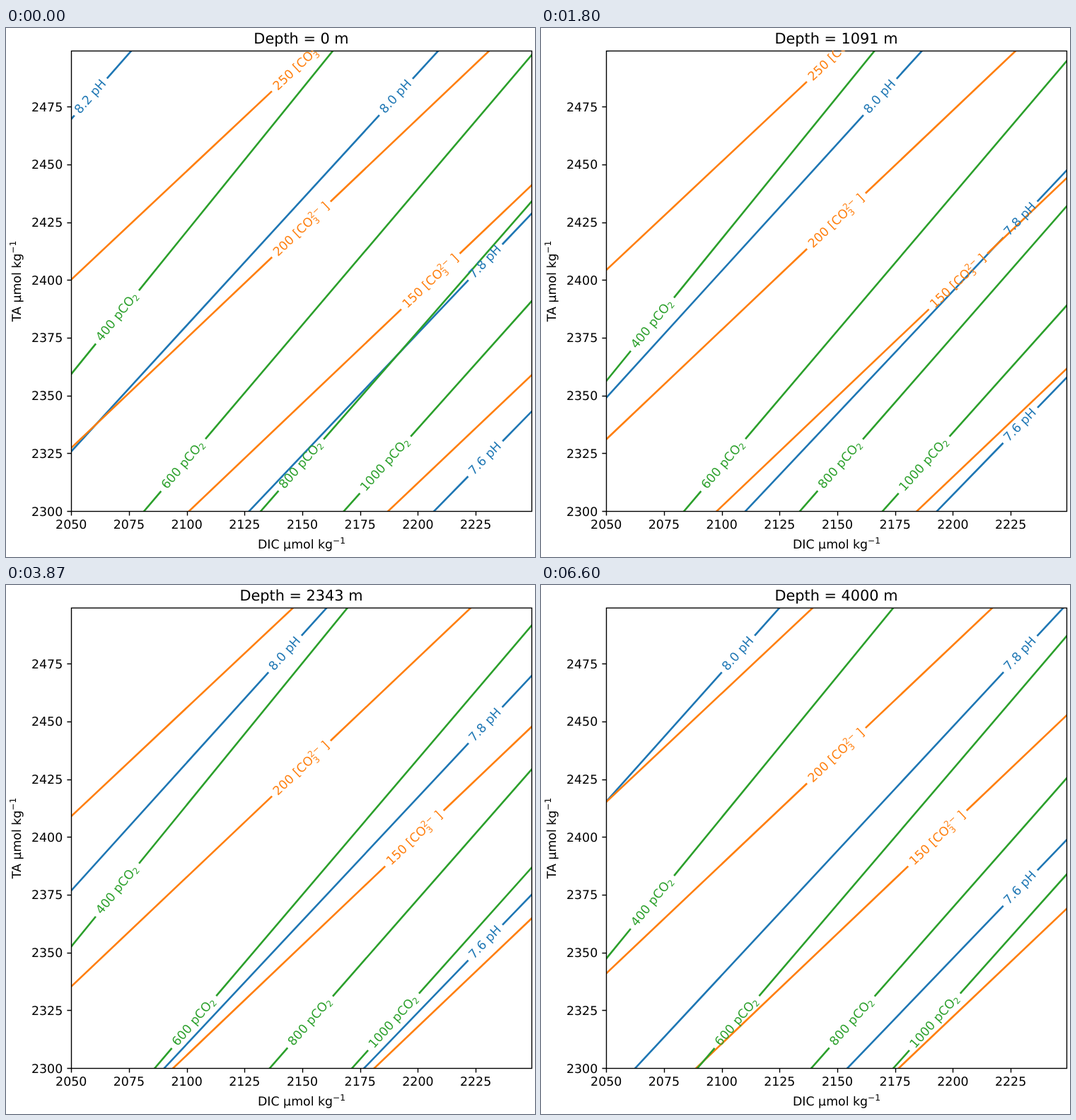
Write an HTML page that moves like this. It is 748x748 px and loops after 6670 ms.

```html
<!DOCTYPE html>
<html lang="en">
<head>
<meta charset="utf-8">
<style>
  html, body { margin: 0; width: 100%; height: 100%; overflow: hidden; background: #fff; }
  svg { display: block; width: 748px; height: 748px; }
  text { font-family: "DejaVu Sans", sans-serif; font-size: 17.36px; text-rendering: geometricPrecision; }
  .script { font-size: 12.15px; }
  .axes { fill: none; stroke: #000; stroke-width: 1.39; }
  .contour { fill: none; stroke-width: 2.6; }
  .mid { text-anchor: middle; }
  .end { text-anchor: end; }
</style>
</head>
<body>
<svg viewBox="0 0 748 748">
  <defs><clipPath id="plot"><rect x="92" y="32" width="651" height="651"/></clipPath></defs>
  <rect width="748" height="748" fill="#fff"/>
  <g id="lines" clip-path="url(#plot)"></g>
  <path id="ticks" class="axes"/>
  <rect class="axes" x="92.5" y="32.5" width="651" height="651"/>
  <g id="tickLabels"></g>
  <g id="labels" clip-path="url(#plot)"></g>
  <text id="title" class="mid" x="417.5" y="22.3" style="font-size:20.83px"></text>
  <text class="mid" x="418" y="736">DIC µmol kg<tspan class="script" dy="-6.65">−1</tspan></text>
  <text class="mid" transform="translate(20.5 358) rotate(-90)">TA µmol kg<tspan class="script" dy="-6.65">−1</tspan></text>
</svg>
<script>
const LEFT = 92.5, TOP = 32.5, RIGHT = 743.5, BOTTOM = 683.5;
const STEPS = 100, LOOP = 6670, MID = 48 / 99;
const BLUE = '#1f77b4', ORANGE = '#ff7f0e', GREEN = '#2ca02c';
const $ = id => document.getElementById(id);

function add(parent, tag, attrs, html = '') {
  const el = document.createElementNS('http://www.w3.org/2000/svg', tag);
  for (const key in attrs) el.setAttribute(key, attrs[key]);
  el.innerHTML = html;
  parent.appendChild(el);
  return el;
}

const pH = value => ({ html: value + ' pH', half: 34.8, drop: 4.8 });
const pCO2 = value => ({
  html: value + ' pCO<tspan class="script" dy="2.85">2</tspan>',
  half: value < 1000 ? 48.4 : 53.9, drop: 4.8
});
const carbonate = value => ({
  html: value + ' [CO<tspan class="script" dy="4.75">3</tspan>' +
    '<tspan class="script" dx="-7.73" dy="-11.4">2−</tspan><tspan dy="6.65"> ]</tspan>',
  half: 57, drop: 5.3
});

// from/to: plot edge, then the crossing at the start, middle and end depth.
// at: the fixed coordinate of the label's centre.
const contours = [
  { color: BLUE, from: ['L', 128.5, -42.7, -225], to: ['T', 177, 21.8, -143], label: pH('8.2'), at: { y: 97.5 } },
  { color: BLUE, from: ['L', 598.5, 461.5, 306], to: ['T', 611, 481, 337], label: pH('8.0'), at: { y: 97.5 } },
  { color: BLUE, from: ['B', 343.5, 244.9, 133], to: ['R', 262, 152, 27], label: pH('7.8'), at: { x: 677.8 } },
  { color: BLUE, from: ['B', 605, 523.5, 433], to: ['R', 542, 456, 360], label: pH('7.6'), at: { x: 677.8 } },
  { color: ORANGE, from: ['L', 355.5, 331.7, 306.5], to: ['T', 436.5, 411, 384], label: carbonate(250), at: { x: 417.5 } },
  { color: ORANGE, from: ['L', 593.5, 572, 549], to: ['T', 683, 661.5, 638], label: carbonate(200), at: { x: 417.5 } },
  { color: ORANGE, from: ['B', 258.5, 240, 219], to: ['R', 222, 204, 184], label: carbonate(150), at: { y: 358.3 } },
  { color: ORANGE, from: ['B', 540, 524, 505.5], to: ['R', 490.5, 474.5, 457.5], at: { y: 600 } },
  { color: GREEN, from: ['L', 489, 507, 528], to: ['T', 462, 479, 498], label: pCO2(400), at: { x: 157.5 } },
  { color: GREEN, from: ['B', 195, 207.5, 221], to: ['R', 38, 53.5, 72], label: pCO2(600), at: { y: 618 } },
  { color: GREEN, from: ['B', 360, 370.5, 382], to: ['R', 245, 257.5, 273], label: pCO2(800), at: { y: 618 } },
  { color: GREEN, from: ['B', 477.5, 487, 498], to: ['R', 386, 397, 409], label: pCO2(1000), at: { y: 617.7 } }
];

for (const c of contours) {
  c.path = add($('lines'), 'path', { class: 'contour', stroke: c.color });
  if (c.label) c.text = add($('labels'), 'text', { class: 'mid', fill: c.color, y: c.label.drop }, c.label.html);
}

const snap = v => Math.round(v) + 0.5;
let tickPath = '';
for (let i = 0; i < 8; i++) {
  const x = 92.2 + i * 81.7, y = 683 - i * 81.7;
  tickPath += `M${snap(x)} ${BOTTOM}v6.08M${LEFT} ${snap(y)}h-6.08`;
  add($('tickLabels'), 'text', { class: 'mid', x, y: 707.8 }, 2050 + i * 25);
  add($('tickLabels'), 'text', { class: 'end', x: 80.2, y: y + 6.5 }, 2300 + i * 25);
}
$('ticks').setAttribute('d', tickPath);

// Quadratic through the three crossings.
function edgePoint([edge, a, b, c], u) {
  const bend = (b - a - (c - a) * MID) / (MID * (1 - MID));
  const v = a + (c - a) * u + bend * u * (1 - u);
  return { L: [LEFT, v], R: [RIGHT, v], T: [v, TOP], B: [v, BOTTOM] }[edge];
}

function place(c, u) {
  const [x0, y0] = edgePoint(c.from, u), [x1, y1] = edgePoint(c.to, u);
  const angle = Math.atan2(y1 - y0, x1 - x0);
  const slope = (y1 - y0) / (x1 - x0);
  const x = c.at.x ?? x0 + (c.at.y - y0) / slope;
  const y = c.at.y ?? y0 + (c.at.x - x0) * slope;
  const inside = x > LEFT && x < RIGHT && y > TOP && y < BOTTOM;
  const gap = c.label && inside ? c.label.half : 0;
  const point = r => `${(x + r * Math.cos(angle)).toFixed(2)} ${(y + r * Math.sin(angle)).toFixed(2)}`;
  c.path.setAttribute('d', gap
    ? `M${point(-1500)}L${point(-gap)}M${point(gap)}L${point(1500)}`
    : `M${point(-1500)}L${point(1500)}`);
  if (c.text) {
    c.text.setAttribute('visibility', inside ? 'visible' : 'hidden');
    c.text.setAttribute('transform', `translate(${x} ${y}) rotate(${angle * 180 / Math.PI})`);
  }
}

function draw(ms) {
  const tick = Math.floor((ms % LOOP) / 10) * 10;
  const step = Math.min(STEPS - 1, Math.floor((tick + 5) * 0.015));
  const u = step / (STEPS - 1);
  $('title').textContent = `Depth = ${Math.round(4000 * u)} m`;
  for (const c of contours) place(c, u);
}

let start;
function frame(now) {
  start ??= now;
  draw(Math.max(0, now - start));
  requestAnimationFrame(frame);
}
draw(0);
requestAnimationFrame(frame);
</script>
</body>
</html>
```
